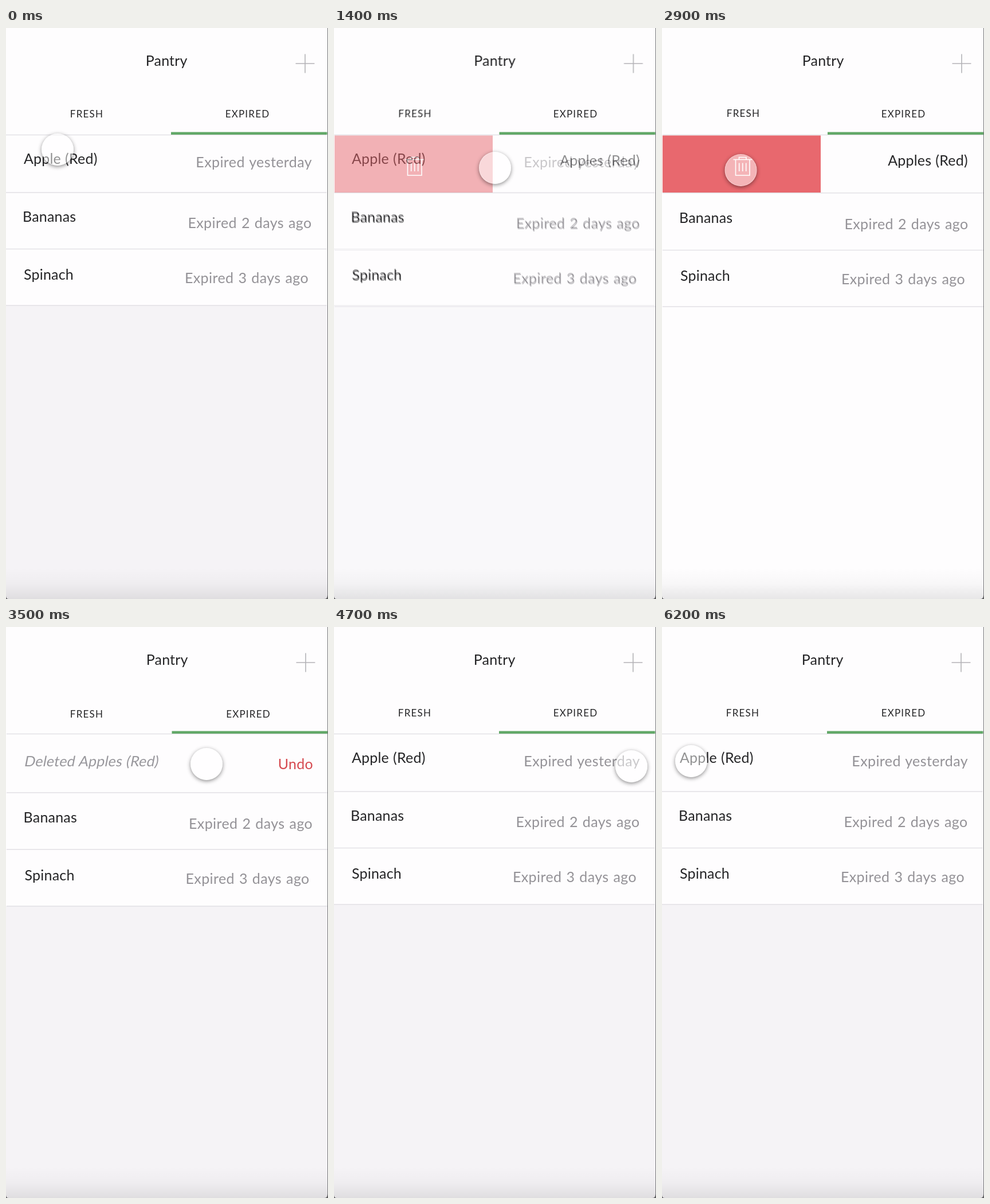
Write an HTML page that moves like this. It is 562 px wide and 996 px high and loops after 6300 ms.

```html
<!DOCTYPE html>
<html lang="en">
<head>
<meta charset="utf-8">
<title>Pantry</title>
<style>
  html, body { margin: 0; width: 100%; height: 100%; overflow: hidden; background: #fefdfe; }
  #stage { position: absolute; left: 0; top: 0; width: 562px; height: 996px; overflow: hidden; }
  svg { position: absolute; left: 0; top: 0; display: block; }
  text { font: 400 25px Lato, "Open Sans", sans-serif; letter-spacing: .2px; word-spacing: .5px; fill: #252527; }
  .mid { text-anchor: middle; }
  .tab { font-size: 17px; letter-spacing: 1.2px; }
  .note { letter-spacing: .4px; word-spacing: 1.2px; fill: #949297; }
  .gone { fill: #98979c; }
  .undo { fill: #d64a50; }
  #touch {
    position: absolute; left: -28px; top: -28px; width: 56px; height: 56px; box-sizing: border-box;
    border-radius: 50%; border: 1px solid rgba(255,255,255,.35); background: rgba(255,255,255,.5);
    box-shadow: 0 2px 7px rgba(0,0,0,.45);
  }
</style>
</head>
<body>
<div id="stage">
  <svg width="562" height="996" viewBox="0 0 562 996">
    <defs>
      <linearGradient id="shade" x1="0" y1="0" x2="0" y2="1">
        <stop offset="0" stop-color="#000" stop-opacity="0"/>
        <stop offset=".5" stop-color="#000" stop-opacity=".025"/>
        <stop offset="1" stop-color="#000" stop-opacity=".09"/>
      </linearGradient>
    </defs>
    <g id="screens"></g>
    <rect y="942" width="562" height="54" fill="url(#shade)"/>
    <rect x="561" width="1" height="996" fill="#77777a"/>
    <path d="M0 991V996H5Q0 996 0 991ZM562 990V996H555Q561 996 561 990Z" fill="#5a5a5c"/>
  </svg>
  <div id="touch"></div>
</div>
<script>
const LOOP = 6300, STEP = 100;

const text = (x, y, str, cls = '') => `<text x="${x}" y="${y}" class="${cls}">${str}</text>`;
const mid = (x, y, str, cls = '') => text(x, y, str, 'mid ' + cls);
const rect = (x, y, w, h, fill) => `<rect x="${x}" y="${y}" width="${w}" height="${h}" fill="${fill}"/>`;

// dx: horizontal nudge of the whole layout; lines: row dividers, top to bottom
function screen({ dx, lines, below, fresh, expired, bar, notes, names, row }) {
  const [top, , , end] = lines;
  return `<g>
    ${rect(0, 0, 562, 996, '#fefdfe')}
    ${rect(0, end, 562, 996 - end, below)}
    ${mid(280.2 + Math.min(dx, 1), 66, 'Pantry')}
    <path d="M${505.5 + Math.min(dx, 1)} 62h33m-16.5 -16.5v33" fill="none" stroke="#b4b3b7" stroke-width="1.6"/>
    ${mid(fresh[0], fresh[1], 'FRESH', 'tab')}
    ${mid(expired[0], expired[1], 'EXPIRED', 'tab')}
    ${lines.map(y => rect(dx ? 1 : 0, y - .75, 560, 1.5, '#e2e1e5')).join('')}
    ${rect(bar, top - 5, 272.5, 4.5, '#62a868')}
    ${row}
    ${text(29 + dx, names[0], 'Bananas')}
    ${text(31 + dx, names[1], 'Spinach')}
    ${mid(425.5 + dx, notes[0], 'Expired 2 days ago', 'note')}
    ${mid(420 + dx, notes[1], 'Expired 3 days ago', 'note')}
  </g>`;
}

const trash = `<path d="M124.5 229.5H157M134.5 229V225.5H147V229M128.5 230V257H153V230
  M134.7 235.5V250M140.7 235.5V250M146.7 235.5V250" fill="none" stroke="#fff" stroke-width="1.6"/>`;

const list = screen({
  dx: 0, lines: [186.5, 287, 385.5, 484], below: '#f5f3f6',
  fresh: [141, 156], expired: [421.5, 156], bar: 288,
  names: [337.5, 439], notes: [348.5, 444.5],
  row: text(31, 237, 'Apple (Red)') + mid(432.7, 242.5, 'Expired yesterday', 'note')
});

const swiped = screen({
  dx: 1, lines: [186.5, 287.7, 387.5, 486], below: '#fefdfe',
  fresh: [142, 155], expired: [421.5, 156], bar: 289,
  names: [339.5, 441], notes: [350.5, 446.5],
  row: rect(1, 187.5, 276, 99.5, '#e8686e') + trash + mid(464, 239.5, 'Apples (Red)')
});

const deleted = screen({
  dx: 1.6, lines: [186.5, 289, 388, 487], below: '#f5f3f6',
  fresh: [141, 157.5], expired: [423, 157.5], bar: 289.5,
  names: [340.5, 442], notes: [351.5, 447.5],
  row: `<g transform="translate(31 242.5) skewX(-11)">${text(0, 0, 'Deleted Apples (Red)', 'gone')}</g>`
    + mid(505.3, 248, 'Undo', 'undo')
});

const holder = document.getElementById('screens');
holder.innerHTML = list + swiped + deleted;
const [, swipedEl, deletedEl] = holder.children;
const touch = document.getElementById('touch');

// touch path: time, x, y
const path = [
  [0, 90, 212], [200, 64, 227], [500, 51, 234], [600, 51, 234],
  [900, 182, 240], [1200, 281, 244], [2100, 281, 244],
  [2450, 200, 246], [2800, 138, 248], [3200, 137, 248],
  [3500, 350, 239], [3900, 493, 234], [4200, 519.5, 240.5], [4600, 519, 243],
  [4900, 519, 243], [5100, 340, 234], [5300, 174, 234],
  [5600, 71, 234], [5900, 51, 234], [LOOP, 51, 234]
];

const clamp = v => Math.max(0, Math.min(1, v));
const slope = (i, k) => (path[i + 1][k] - path[i][k]) / (path[i + 1][0] - path[i][0]);

// monotone tangent: flat at ends and turning points
function tangent(i, k) {
  if (i === 0) return slope(0, k);
  if (i === path.length - 1) return 0;
  const a = slope(i - 1, k), b = slope(i, k);
  return a * b > 0 ? 2 * a * b / (a + b) : 0;
}

function along(t, k) {
  let i = 0;
  while (i < path.length - 2 && t >= path[i + 1][0]) i++;
  const d = path[i + 1][0] - path[i][0];
  const u = (t - path[i][0]) / d, v = 1 - u;
  return path[i][k] * v * v * (1 + 2 * u) + path[i + 1][k] * u * u * (3 - 2 * u)
    + d * u * v * (v * tangent(i, k) - u * tangent(i + 1, k));
}

function draw(now) {
  const t = Math.floor((now % LOOP) / STEP) * STEP;
  swipedEl.setAttribute('opacity', t < 3000 ? clamp((t - 1200) / 400) : 0);
  deletedEl.setAttribute('opacity', t >= 3000 && t < 4700 ? 1 : 0);
  touch.style.transform = `translate(${along(t, 1)}px, ${along(t, 2)}px)`;
}

const start = performance.now();
function tick() {
  draw(performance.now() - start);
  requestAnimationFrame(tick);
}
tick();
</script>
</body>
</html>
```
